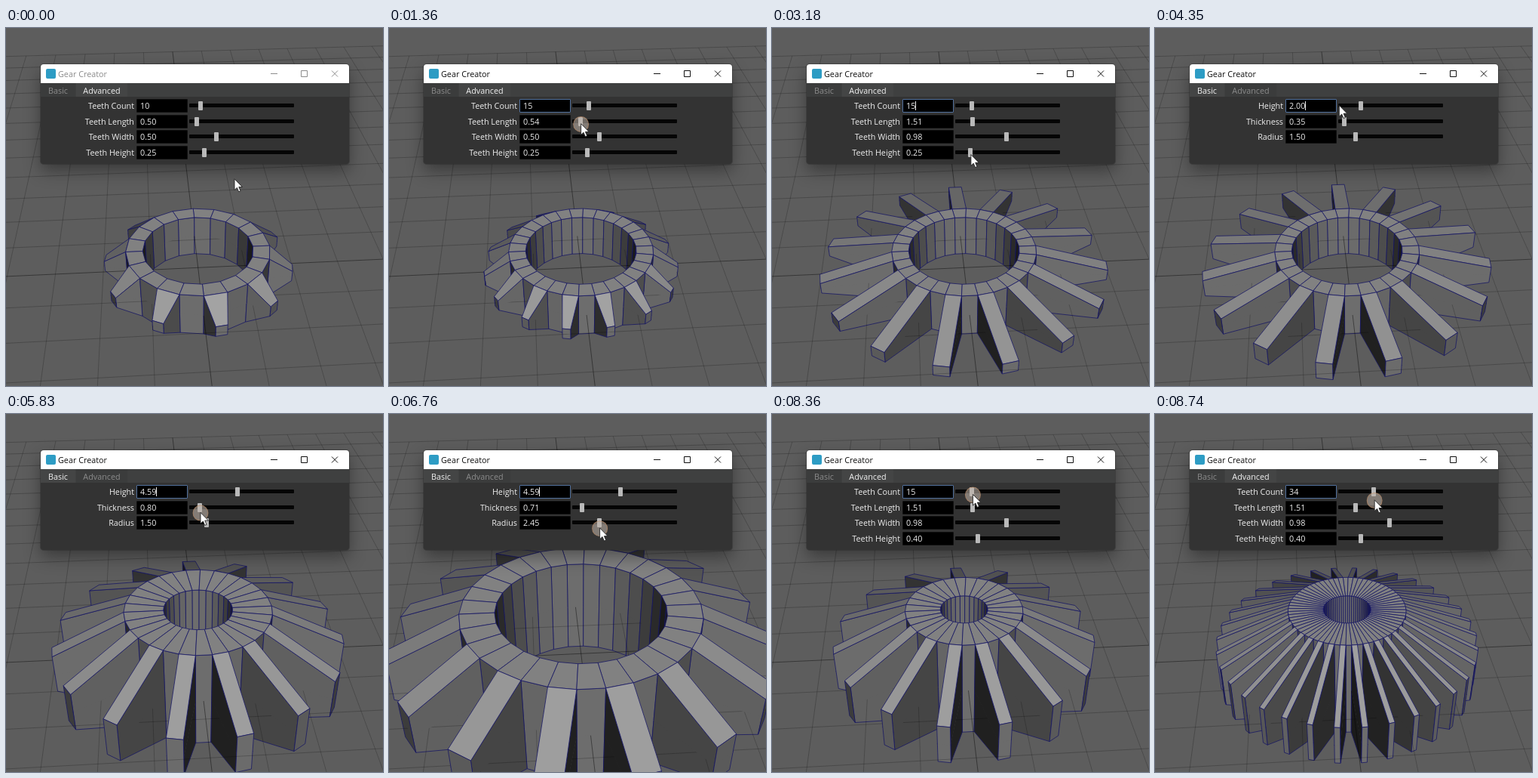
Animation, 500 px wide and 474 px high, one loop 8.79 s. Source, as an HTML page with a canvas:

```html
<!DOCTYPE html>
<html lang="en">
<head>
<meta charset="utf-8">
<title>Gear Creator</title>
<style>
html, body { margin: 0; width: 100%; height: 100%; overflow: hidden; background: #5d5d5d; }
#stage { position: relative; width: 500px; height: 474px; overflow: hidden; font: 10.8px/18px "Open Sans", "Noto Sans", sans-serif; }
#stage * { position: absolute; box-sizing: border-box; white-space: nowrap; }
canvas { left: 0; top: 0; }
#dialog { left: 46px; top: 48px; width: 409px; height: 132px; background: #333; border-radius: 4px; box-shadow: 0 0 0 1px rgba(40,40,40,.4), 0 9px 22px rgba(0,0,0,.38); color: #eee; }
#bar { left: 0; top: 0; width: 100%; height: 25px; background: #fff; border-radius: 4px 4px 0 0; color: #111; }
#bar.idle { color: #8c8c8c; }
#icon { left: 7px; top: 6px; width: 13px; height: 13px; background: #2d9cc4; border-radius: 2px; }
#title { left: 23px; top: 4px; }
#bar svg { left: 299.500px; top: 0; fill: none; stroke: currentColor; }
#tabs { left: 0; top: 25px; width: 100%; height: 18px; background: #3f4040; }
.tab { top: 0; height: 18px; text-align: center; background: #3b3c3c; color: #8b8b8b; line-height: 20px; }
.tab.on { background: #444545; color: #f2f2f2; }
.row { left: 0; width: 100%; height: 18px; }
.label { right: 285px; top: 0; }
.field { left: 127px; top: 0; width: 68px; height: 18px; background: #000; border: 1px solid #101010; padding-left: 4px; line-height: 16px; border-radius: 1px; }
.field.focus { border-color: #51709c; }
.field span, .caret { position: static !important; }
.caret { display: inline-block; width: 1px; height: 12px; background: #eee; vertical-align: -2px; }
.groove { left: 197px; top: 6px; width: 139px; height: 5px; background: #050505; border-radius: 1px; }
.knob { top: 3px; width: 6px; height: 12px; background: #b9b9b9; border-radius: 1px; }
#press { width: 21px; height: 21px; border-radius: 50%; background: rgba(190,178,168,.58); border: 1px solid rgba(190,130,85,.5); }
</style>
</head>
<body>
<div id="stage">
  <canvas width="500" height="474"></canvas>
  <div id="dialog">
    <div id="bar">
      <div id="icon"></div><div id="title">Gear Creator</div>
      <svg width="110" height="25"><path d="M5 12.5h9M45.500 8.500h8v8h-8zM86 8.500l8 8M94 8.500l-8 8"/></svg>
    </div>
    <div id="tabs">
      <div class="tab" style="left:0;width:46px">Basic</div>
      <div class="tab" style="left:47px;width:68px">Advanced</div>
    </div>
  </div>
  <div id="press"></div>
  <svg id="cursor" width="14" height="20"><path d="M1 .8V15.500L4.400 12.400L6.700 17.800L9.100 16.800L6.800 11.500H11.500Z" fill="#fff" stroke="#222" stroke-width=".9"/></svg>
</div>
<script>
const LOOP = 8790, HOLD = 120;
const $ = s => document.querySelector(s);
const ctx = $('canvas').getContext('2d');

const control = (label, key, value, max, digits = 2, min = 0) => ({ label, key, value, max, digits, min });
const panels = {
  advanced: [control('Teeth Count', 'count', 10, 100, 0, 1), control('Teeth Length', 'length', .5, 10),
             control('Teeth Width', 'width', .5, 2), control('Teeth Height', 'tooth', .25, 2)],
  basic: [control('Height', 'height', 2, 10), control('Thickness', 'thick', .35, 10), control('Radius', 'radius', 1.5, 10)]
};
const tabX = { basic: 68, advanced: 126 };
const controls = Object.values(panels).flat();

// What the user does: drag a slider through some values, or click a tab
const drag = (key, start, end, ...path) => ({ key, start, end, path });
const click = (tab, start) => ({ tab, start, end: start });
const steps = [
  drag('count', 480, 960, 10, 15),
  drag('length', 1340, 1850, .49, 3.3, 1.51),
  drag('width', 2180, 2800, .5, .98),
  drag('tooth', 3200, 3730, .25, .75, .4),
  click('basic', 4050),
  drag('height', 4640, 5450, 2, 4.59),
  drag('thick', 5650, 6010, .35, .8, .71),
  drag('radius', 6180, 7350, 1.5, 2.5, 2.4, 1.19),
  click('advanced', 7880),
  drag('count', 8330, 8740, 15, 34)
];

const mix = (a, b, u) => a + (b - a) * u;
const smooth = u => u * u * (3 - 2 * u);
const settle = u => 1 - (1 - u) ** 4;

function along(path, u) {
  const s = Math.min(u, .9999) * (path.length - 1), i = Math.floor(s);
  return mix(path[i], path[i + 1], smooth(s - i));
}
const rowY = i => 103 + i * 20.6;
const knobX = (c, v) => 246.5 + 131 * (v - c.min) / (c.max - c.min);

function pointerAt(step, u) {
  if (step.tab) return [tabX[step.tab], 83];
  const c = controls.find(c => c.key === step.key);
  const row = Object.values(panels).find(p => p.includes(c)).indexOf(c);
  return [knobX(c, along(step.path, u)) + 1, rowY(row) + 3 + 8 * u];
}

function stateAt(t) {
  const g = Object.fromEntries(controls.map(c => [c.key, c.value]));
  const state = { g, panel: 'advanced', pointer: [303, 200], pressed: false };
  let free = HOLD;
  for (const step of steps) {
    if (t < step.start) {
      const u = settle(Math.max(0, (t - free) / (step.start - free)));
      state.pointer = pointerAt(step, 0).map((v, i) => mix(state.pointer[i], v, u));
      break;
    }
    const u = Math.min(1, (t - step.start) / (step.end - step.start || 1));
    if (step.tab) state.panel = step.tab;
    else g[step.key] = along(step.path, u);
    state.pointer = pointerAt(step, u);
    free = step.end + HOLD;
    state.pressed = t < free;
    if (state.pressed) break;
  }
  g.count = Math.round(g.count);
  return state;
}

// Camera: pitch, yaw, scale at the world origin and inverse distance
const SIN = .622, COS = .783, YAW = 4.2 * Math.PI / 180, SCALE = 62.5, NEAR = .067;
function project([x, y, z]) {
  const X = x * Math.cos(YAW) + z * Math.sin(YAW), Z = z * Math.cos(YAW) - x * Math.sin(YAW);
  const d = 1 - NEAR * (Z * COS + y * SIN);
  return [254.7 + SCALE * X / d, 317.3 + SCALE * (Z * SIN - y * COS) / d, d];
}

const LIGHT = [0, .77, .638];
function shade([p, q, r]) {
  const u = q.map((v, i) => v - p[i]), w = r.map((v, i) => v - q[i]);
  const n = [u[1] * w[2] - u[2] * w[1], u[2] * w[0] - u[0] * w[2], u[0] * w[1] - u[1] * w[0]];
  const lit = n.reduce((s, v, i) => s + v * LIGHT[i], 0) / (Math.hypot(...n) || 1);
  const c = Math.round(Math.max(26, 12 + 152 * lit));
  return `rgb(${c},${c},${c})`;
}

// Faces above (side 1) or below (side -1) the ground plane
function gearHalf(g, side) {
  const faces = [], segs = 2 * g.count, half = Math.PI / segs;
  const top = side * g.height / 4, tipTop = top * g.tooth, mid = side > 0 ? 0 : .02;
  const at = (r, a, y) => [r * Math.cos(a), y, r * Math.sin(a)];
  const level = (p, y) => [p[0], y, p[2]];
  const add = (pts, closed) => faces.push({ pts: side > 0 ? pts : pts.reverse(), closed });
  const wall = (a, b) => add([level(a, mid), a, b, level(b, mid)], false);
  const inner = g.radius - g.thick;
  for (let i = 0; i < segs; i++) {
    const a = 2 * half * i, b = a + 2 * half, c = a + half;
    const A = at(g.radius, a, top), B = at(g.radius, b, top);
    const iA = at(inner, a, top), iB = at(inner, b, top);
    wall(iB, iA);
    add([iA, iB, B, A], true);
    if (i % 2) { wall(A, B); continue; }
    const reach = g.radius * Math.cos(half) + g.length, w = g.radius * Math.sin(half) * g.width;
    const tip = s => [reach * Math.cos(c) - s * w * Math.sin(c), tipTop, reach * Math.sin(c) + s * w * Math.cos(c)];
    const tA = tip(-1), tB = tip(1);
    wall(A, tA);
    wall(tA, tB);
    wall(tB, B);
    add([A, B, tB, tA], true);
  }
  return faces;
}

function drawFaces(faces) {
  for (const f of faces) {
    f.flat = f.pts.map(project);
    f.depth = f.flat.reduce((s, p) => s + p[2], 0);
    f.area = f.flat.reduce((s, p, i) => {
      const q = f.flat[(i + 1) % 4];
      return s + p[0] * q[1] - q[0] * p[1];
    }, 0);
  }
  ctx.lineWidth = .75;
  ctx.lineJoin = 'round';
  ctx.strokeStyle = '#141464';
  for (const f of faces.filter(f => f.area < 0).sort((a, b) => b.depth - a.depth)) {
    ctx.beginPath();
    f.flat.forEach(p => ctx.lineTo(p[0], p[1]));
    if (f.closed) ctx.closePath();
    ctx.fillStyle = shade(f.pts);
    ctx.fill();
    ctx.stroke();
  }
}

function drawGrid() {
  const line = (...ends) => {
    ctx.beginPath();
    ends.map(project).forEach(p => ctx.lineTo(p[0], p[1]));
    ctx.stroke();
  };
  ctx.lineWidth = 1;
  for (let i = -12; i <= 12; i++) {
    ctx.strokeStyle = `rgba(0,0,0,${i ? .21 : .42})`;
    line([i, 0, -12], [i, 0, 12]);
    line([-12, 0, i], [12, 0, i]);
  }
}

function drawScene(g) {
  ctx.fillStyle = '#5d5d5d';
  ctx.fillRect(0, 0, 500, 474);
  drawFaces(gearHalf(g, -1));
  drawGrid();
  drawFaces(gearHalf(g, 1));
}

const rows = panels.advanced.map((_, i) => {
  const el = document.createElement('div');
  el.className = 'row';
  el.style.top = rowY(i) - 57 + 'px';
  el.innerHTML = '<div class="label"></div><div class="field"><span></span><i class="caret"></i></div><div class="groove"></div><div class="knob"></div>';
  $('#dialog').append(el);
  return el;
});

function drawPanel({ g, panel }, t) {
  $('#bar').className = t < HOLD ? 'idle' : '';
  document.querySelectorAll('.tab').forEach(tab => tab.classList.toggle('on', tab.textContent.toLowerCase() === panel));
  rows.forEach((el, i) => {
    const c = panels[panel][i], focus = i === 0 && t >= steps[0].start;
    el.style.display = c ? '' : 'none';
    if (!c) return;
    const [label, field, , knob] = el.children, [text, caret] = field.children;
    label.textContent = c.label;
    text.textContent = g[c.key].toFixed(c.digits);
    knob.style.left = knobX(c, g[c.key]) - 49 + 'px';
    field.classList.toggle('focus', focus);
    caret.style.visibility = focus && t > 1900 && t < 8300 ? 'visible' : 'hidden';
  });
}

function place(el, x, y) { el.style.transform = `translate(${x}px,${y}px)`; }

function frame() {
  const t = performance.now() % LOOP, state = stateAt(t), [x, y] = state.pointer;
  drawScene(state.g);
  drawPanel(state, t);
  place($('#cursor'), x - 1, y - 1);
  place($('#press'), x - 10.5, y - 10);
  $('#press').style.visibility = state.pressed ? 'visible' : 'hidden';
  requestAnimationFrame(frame);
}
frame();
</script>
</body>
</html>
```
